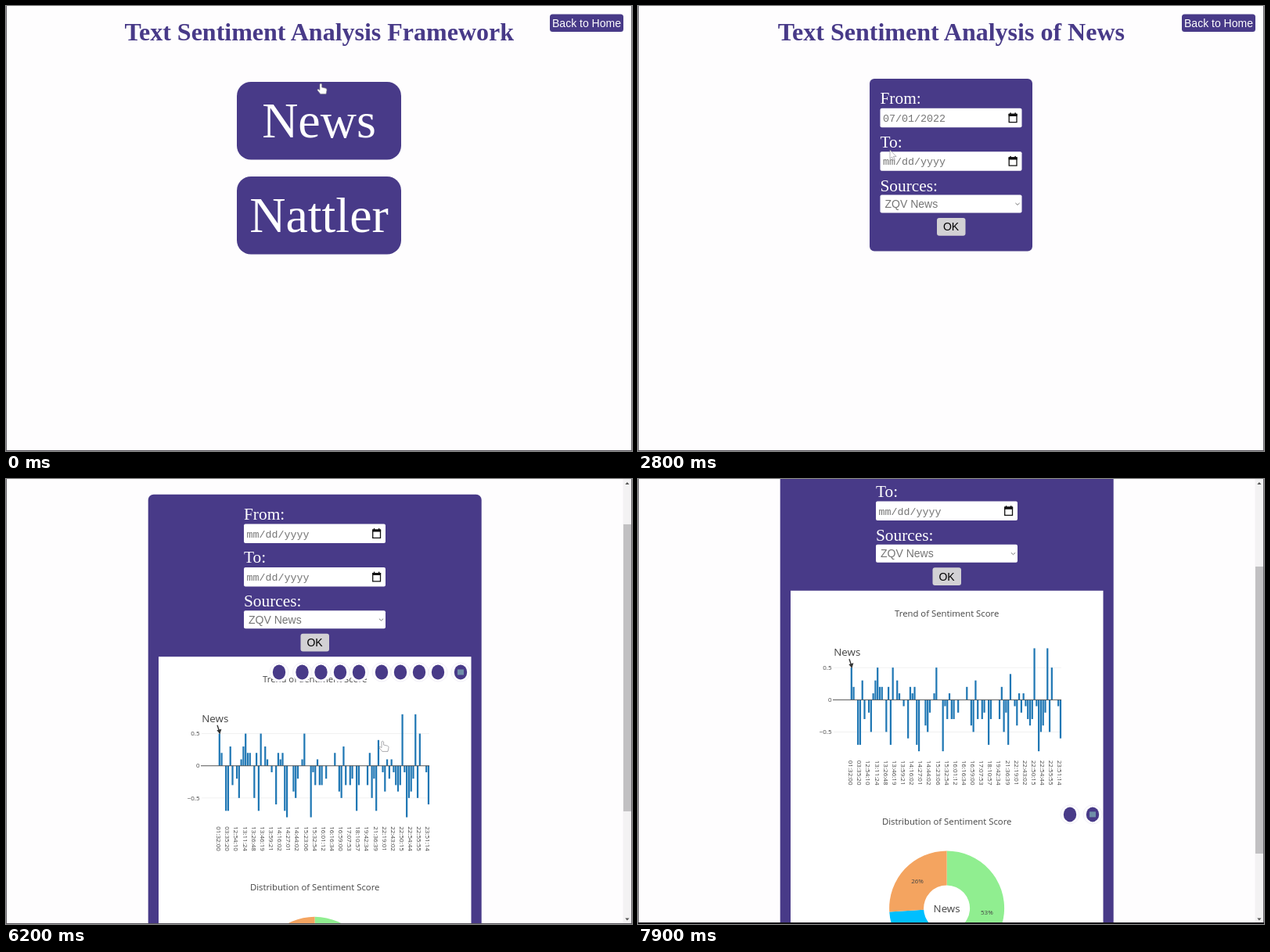
These frames come from a looping animation (800 px wide and 569 px high, 8 s). An HTML page:

```html
<!DOCTYPE html>
<html lang="en">
<head>
<meta charset="utf-8">
<title>Text Sentiment Analysis Framework</title>
<style>
  html, body { margin: 0; width: 100%; height: 100%; overflow: hidden; background: #fefdfe; }
  svg { display: block; width: 800px; height: 569px; }
  .serif { font-family: "Liberation Serif", serif; }
  .sans { font-family: "Liberation Sans", sans-serif; }
  .mono { font: 13.33px "Liberation Mono", monospace; fill: #757575; }
  .plot { font-family: "Open Sans", sans-serif; fill: #444; }
  .title { font-size: 32px; font-weight: bold; fill: #483a88; }
  .mid { text-anchor: middle; }
  .end { text-anchor: end; }
</style>
</head>
<body>
<svg id="stage" viewBox="0 0 800 569" xmlns="http://www.w3.org/2000/svg"></svg>
<script>
const LOOP = 8000, INK = '#483a88', BLUE = '#1f77b4';
const stage = document.getElementById('stage');

const rect = (x, y, w, h, r, fill, more = '') =>
  `<rect x="${x}" y="${y}" width="${w}" height="${h}" rx="${r}" fill="${fill}" ${more}/>`;
const text = (x, y, size, cls, str, more = '') =>
  `<text x="${x}" y="${y}" font-size="${size}" class="${cls}" ${more}>${str}</text>`;
const group = (id, body, more = '') => `<g id="${id}" ${more}>${body}</g>`;

const header = (title, cx, bx) =>
  text(cx, 44, 32, 'serif title mid', title) +
  rect(bx, 10.5, 94, 22.5, 3.5, INK) +
  text(bx + 47, 26.5, 14, 'sans mid', 'Back to Home', 'fill="#fff"');

const bigButton = (y, label) =>
  rect(295, y, 210, 99.5, 18, INK) +
  text(400, y + 71, 64, 'serif mid', label, 'fill="#fff"');

const calendar = y =>
  `<path d="M474.2 ${y + 1.7}h9.8v10.2h-9.8z" fill="none" stroke="#111" stroke-width="1.3"/>` +
  rect(473.6, y + 1, 11, 3.2, 0.5, '#111') +
  rect(475.3, y - 0.3, 1.5, 2, 0, '#111') + rect(481.4, y - 0.3, 1.5, 2, 0, '#111');

const dateField = (y, label, id) =>
  text(309.5, y - 5.5, 21.33, 'serif', label, 'fill="#fff"') +
  rect(309.5, y, 181, 24.5, 2, '#fff') +
  `<text id="${id}" x="313" y="${y + 17.2}" class="mono">mm/dd/yyyy</text>` +
  calendar(y + 6);

const form = id =>
  dateField(130.7, 'From:', id + 'From') +
  dateField(186.2, 'To:', id + 'To') +
  text(309.5, 236.5, 21.33, 'serif', 'Sources:', 'fill="#fff"') +
  rect(309.5, 241.5, 181, 23, 2, '#fff') +
  text(315.5, 258, 14, 'sans', 'ZQV News', 'fill="#757575"') +
  '<path d="M482.4 252l2.6 2.4 2.6-2.4" fill="none" stroke="#777"/>' +
  rect(382, 271, 36.5, 22.8, 3, '#d2d1d4') +
  text(400, 287.3, 14, 'sans mid', 'OK', 'fill="#000"');

// Scores in tenths, one bar each
const scores = [
  5, 2, 0, -7, -7, 3, -3, 0, -2, -5, 1, 3, 5, 2, 2, 0, -5, 2, -7, 5,
  0, 3, 1, 0, -1, 0, -6, 2, 1, 2, -7, -8, 0, 0, -4, -5, -2, 0, 1, 5,
  0, 0, -8, -1, -3, 1, -3, -3, 0, -2, 0, 0, 0, 2, 0, -4, -5, 3, -3, 0,
  -3, -2, 0, -7, -3, 0, 0, 0, -3, 2, -5, -2, -7, 4, 0, -1, -4, 1, -2, 1,
  -1, -3, -4, -3, 8, -1, -8, -5, -4, -2, 8, -5, 5, 0, 0, -1, -6];
const times = ('01:32:00 03:35:20 12:54:10 13:11:24 13:26:48 13:46:19 13:59:21 14:16:02 14:27:01 ' +
  '14:44:02 15:23:06 15:32:54 16:01:12 16:16:34 16:59:00 17:07:53 18:10:57 19:42:34 21:36:39 ' +
  '22:19:01 22:43:02 22:50:15 22:54:44 22:55:55 23:51:14').split(' ');
const barX = i => 272.8 + i * 2.783;
const scoreY = v => 440 - v * 8.23;

function barChart() {
  let s = text(394.7, 333.3, 11.33, 'plot mid', 'Trend of Sentiment Score');
  for (const v of [5, -5]) s += rect(250, scoreY(v) - 0.4, 291, 0.8, 0, '#eee');
  scores.forEach((v, i) => {
    if (v) s += rect(barX(i) - 1.11, Math.min(440, scoreY(v)), 2.22, Math.abs(v) * 8.23, 0, BLUE);
  });
  s += rect(249, 439.6, 292, 0.9, 0, '#444');
  s += text(247.5, 401.8, 8, 'plot end', '0.5') + text(247.5, 442.8, 8, 'plot end', '0') +
    text(247.5, 484, 8, 'plot end', '\u22120.5');
  times.forEach((label, i) => {
    s += text(0, 0, 8, 'plot', label, `transform="translate(${barX(i * 4) - 3.6} 517.5) rotate(90)"`);
  });
  s += text(267.3, 384, 13.33, 'plot mid', 'News');
  return s + '<path d="M270 388l2.2 6.5" stroke="#333" stroke-width="1.4"/>' +
    '<path d="M269.4 394.6l6-1.6-2 6.6z" fill="#333"/>';
}

function pieChart() {
  const cx = 394.6, cy = 706.6, R = 73.5, r = 29.5;
  const at = (p, d) => {
    const a = p / 100 * 2 * Math.PI;
    return [cx + d * Math.sin(a), cy - d * Math.cos(a)];
  };
  const slices = [[53, '#90ee90', 51.5], [2, '#8a2be2', 0], [9, '#d3d3d3', 57.5],
    [10, '#00bfff', 55.5], [26, '#f4a460', 51.5]];
  let s = text(394.7, 599.3, 11.33, 'plot mid', 'Distribution of Sentiment Score'), p = 0;
  for (const [share, fill, d] of slices) {
    const q = p + share, big = +(share > 50);
    s += `<path fill="${fill}" d="M${at(p, R)}A${R} ${R} 0 ${big} 1 ${at(q, R)}` +
      `L${at(q, r)}A${r} ${r} 0 ${big} 0 ${at(p, r)}z"/>`;
    if (d) {
      const [x, y] = at((p + q) / 2, d);
      s += text(x, y + 3, 8, 'plot mid', share + '%');
    }
    p = q;
  }
  return s + text(394.6, 711.6, 13.33, 'plot mid', 'News');
}

const toolbar = (y, xs) => xs.map(x =>
  `<circle cx="${x}" cy="${y}" r="12" fill="#fff" stroke="#f1eff6"/>` +
  `<ellipse cx="${x}" cy="${y}" rx="8.2" ry="9.5" fill="${INK}"/>`).join('') +
  rect(577, y - 3.5, 8, 7, 0, '#6f8fa8');

const tip =
  `<path d="M475.8 407.3l5-3.6v-3h60.7v13.4h-60.7v-3.2z" fill="${BLUE}" stroke="#fff" stroke-width=".7"/>` +
  text(483, 410.6, 8.67, 'sans', '(21:55:49, 0.4)', 'fill="#fff"');

const scrollbar =
  rect(788.5, 0, 10.5, 569, 0, '#f3f2f3') +
  '<path d="M791.3 7l2.6-3 2.6 3zM791.3 561.5l2.6 3 2.6-3z" fill="#555"/>' +
  group('thumb', rect(789, 11, 10, 367, 0, '#c1c0c2'));

stage.innerHTML =
  rect(0, 0, 800, 569, 0, '#fefdfe') +
  group('home', header('Text Sentiment Analysis Framework', 400.3, 695) +
    bigButton(97, 'News') + bigButton(218, 'Nattler')) +
  group('search', header('Text Sentiment Analysis of News', 400.3, 695) +
    rect(296, 93, 208, 220.5, 6, INK) + form('a')) +
  group('results',
    group('page', header('Text Sentiment Analysis of News', 394.8, 684) +
      rect(181.7, 93, 426, 749, 7, INK) +
      group('form', form('b'), 'transform="translate(-5.5 0)"') +
      rect(195, 300.5, 399.5, 528, 0, '#fff') +
      barChart() + pieChart() +
      group('barTools', toolbar(320.3, [349, 378.5, 402.5, 427, 451, 480, 504, 528, 552, 581])) +
      group('pieTools', toolbar(586.6, [552, 581])) +
      group('tip', tip)) + scrollbar) +
  group('arrow', '<path d="M0 0v15.5l3.6-3.3 2.5 5.8 2.6-1.1-2.5-5.6h5z" fill="#fff" stroke="#8a8a90" stroke-width=".9"/>') +
  group('hand', '<path d="M0 1q1.5-1.6 2.6 0v4l5 1.2q1.6.6 1.4 2.2l-1 5H.8L-3 8.8q-.2-1.7 1.5-1.2L0 8.6z" fill="#fff" stroke="#8a8a90" stroke-width=".7"/>') +
  rect(0, 0, 0.9, 569, 0, '#58555c') + rect(799.1, 0, 0.9, 569, 0, '#58555c') +
  rect(0, 568, 800, 1, 0, '#58555c') +
  rect(0, 567, 800, 2, 0, '#161418', 'id="edge"');

const el = {};
stage.querySelectorAll('[id]').forEach(n => { el[n.id] = n; });

const clamp = v => Math.max(0, Math.min(1, v));
const easeOut = v => 1 - (1 - v) ** 2;
const smooth = v => v * v * (3 - 2 * v);
const show = (n, on) => n.setAttribute('visibility', on ? 'visible' : 'hidden');
const move = (n, x, y, k = 1) => n.setAttribute('transform', `translate(${x} ${y}) scale(${k})`);

// start, duration, scroll offset reached
const wheel = [[5900, 250, 73.3], [6550, 200, 146], [6800, 177, 219], [7000, 200, 281], [7680, 365, 135]];
function scrollAt(t) {
  let y = 0;
  for (const [start, dur, to] of wheel) y += (to - y) * easeOut(clamp((t - start) / dur));
  return y;
}

// time, x, y of the pointer
const route = [[0, 401, 99], [400, 404, 140], [900, 404, 146], [1400, 430, 205], [1700, 413.5, 185.5],
  [1900, 322, 143], [2700, 322, 143], [2850, 322, 198], [3550, 322, 198], [3800, 433, 249],
  [4400, 402, 280], [5900, 440, 310], [6150, 480, 335], [8000, 480, 335]];
function pointerAt(t) {
  const i = Math.max(1, route.findIndex(p => p[0] > t));
  const [a, x, y] = route[i - 1], [b, u, v] = route[i];
  const k = smooth((t - a) / (b - a));
  return [x + (u - x) * k, y + (v - y) * k];
}

// The year fills from the right, padded with zeros
function typed(t, start, day) {
  const n = Math.floor((t - start) / 100);
  const year = n < 4 ? 'yyyy' : '2022'.slice(0, n - 3).padStart(4, '0');
  return `${n < 0 ? 'mm' : '07'}/${n < 2 ? 'dd' : day}/${year}`;
}

function draw(t) {
  const view = t < 700 ? 'home' : t < 5000 ? 'search' : 'results';
  for (const v of ['home', 'search', 'results']) el[v].style.display = v === view ? '' : 'none';

  el.aFrom.textContent = typed(t, 2000, '01');
  el.aTo.textContent = typed(t, 2900, '24');

  const y = scrollAt(t);
  move(el.page, 0, -y);
  move(el.thumb, 0, y * 0.64);
  el.barTools.setAttribute('opacity', clamp((t - 6000) / 200) * clamp((7400 - t) / 200));
  el.pieTools.setAttribute('opacity', clamp((t - 7200) / 200));
  el.tip.style.display = t >= 6300 && t < 7200 ? '' : 'none';

  const [px, py] = pointerAt(t);
  move(el.hand, px, py);
  move(el.arrow, px, py, t < 1900 ? 1 : 0.72);
  show(el.hand, t < 700 || (t >= 6000 && t < 6800));
  show(el.arrow, t >= 700 && t < 5000);
  show(el.edge, t >= 7200);
}

const begin = performance.now();
function tick(now) {
  draw(Math.max(0, now - begin) % LOOP);
  requestAnimationFrame(tick);
}
draw(0);
requestAnimationFrame(tick);
</script>
</body>
</html>
```
